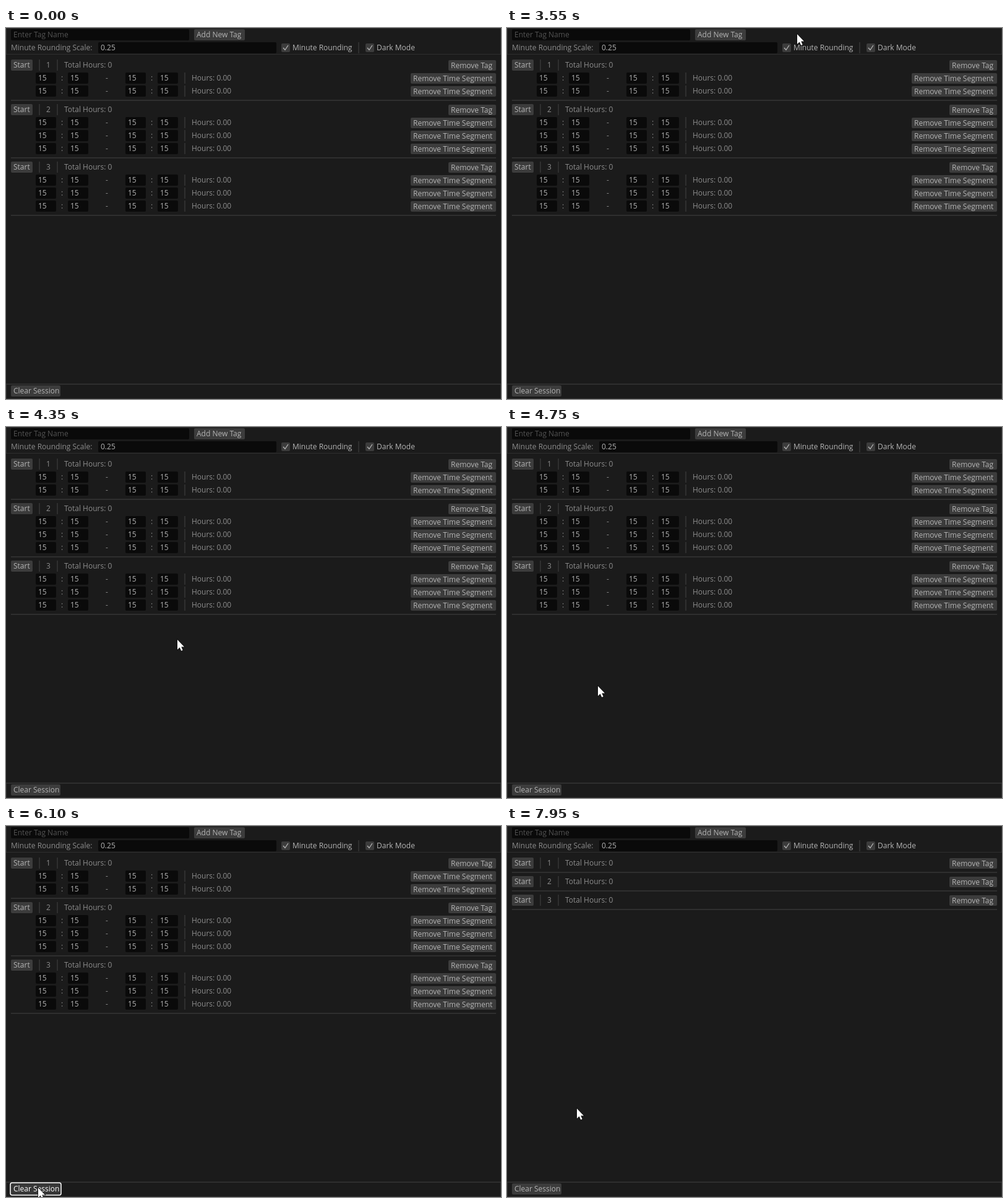
An HTML page with a canvas that plays this animation: 800x600 px, repeating every 8000 ms.

```html
<!DOCTYPE html>
<html lang="en">
<head>
<meta charset="utf-8">
<title>Time tracker</title>
<style>
  html, body { margin: 0; width: 100%; height: 100%; overflow: hidden; background: #1b1b1b; }
  canvas { display: block; }
</style>
</head>
<body>
<canvas id="stage" width="800" height="600"></canvas>
<script>
const ctx = document.getElementById('stage').getContext('2d');
const LOOP = 8000, STEP = 50;
const ENTER = 3550, PRESS = 6100, RELEASE = 7000;
const LABEL = '#8c8c8c', BUTTON_TEXT = '#b4b4b4', LINE = '#2f2f2f';

// Pointer keys: time, x, y
const path = [
  [3550, 469, 10], [4000, 410, 165], [4350, 277, 344], [4750, 147, 419],
  [5200, 87, 493], [5900, 52, 585], [7150, 52, 585], [7200, 52, 580],
  [7650, 52, 580], [7950, 113, 457]
];

function slope(i, axis) {
  const a = path[i], b = path[i + 1];
  return a && b ? (b[axis] - a[axis]) / (b[0] - a[0]) : null;
}

function tangent(i, axis) {
  const before = slope(i - 1, axis), after = slope(i, axis);
  if (before === null) return after;
  if (after === null) return before;
  return before * after <= 0 ? 0 : 2 * before * after / (before + after);
}

function pointerAt(t) {
  if (t < ENTER) return null;
  let i = 0;
  while (i < path.length - 2 && t >= path[i + 1][0]) i++;
  const a = path[i], b = path[i + 1], span = b[0] - a[0];
  const u = Math.min(1, (t - a[0]) / span), v = 1 - u;
  const at = axis => Math.round(
    a[axis] * (1 + 2 * u) * v * v + b[axis] * u * u * (3 - 2 * u) +
    span * u * v * (tangent(i, axis) * v - tangent(i + 1, axis) * u));
  return { x: at(1), y: at(2) };
}

function inside(p, x, y, w, h) {
  return p !== null && p.x >= x && p.x < x + w && p.y >= y && p.y < y + h;
}

function box(x, y, w, h, fill, stroke, radius = 2, line = 1) {
  ctx.beginPath();
  ctx.roundRect(x, y, w, h, radius);
  ctx.fillStyle = fill;
  ctx.fill();
  if (stroke) {
    ctx.strokeStyle = stroke;
    ctx.lineWidth = line;
    ctx.stroke();
  }
}

function rect(x, y, w, h, color = LINE) {
  ctx.fillStyle = color;
  ctx.fillRect(x, y, w, h);
}

function text(str, x, centerY, color = LABEL) {
  ctx.fillStyle = color;
  ctx.fillText(str, x, centerY + 4);
}

function button(str, x, y, w, h = 18) {
  box(x, y, w, h, '#3c3c3c');
  text(str, x + 4, y + Math.ceil(h / 2), BUTTON_TEXT);
}

function field(str, x, y, w, color = BUTTON_TEXT) {
  box(x, y, w, 18, '#0a0a0a');
  text(str, x + 4, y + 9, color);
}

function checkbox(str, x, hot) {
  const color = hot ? '#f0f0f0' : BUTTON_TEXT;
  if (hot) box(x - 1, 24, 16, 16, '#464646', '#969696', 3);
  else box(x, 25, 14, 14, '#3c3c3c');
  ctx.beginPath();
  ctx.moveTo(x + 3, 32);
  ctx.lineTo(x + 6, 35.5);
  ctx.lineTo(x + 11, 28);
  ctx.strokeStyle = color;
  ctx.lineWidth = 1.3;
  ctx.stroke();
  text(str, x + 18, 32, color);
}

function segment(y) {
  for (const x of [48, 100, 193, 245]) field('15', x, y - 9, 33);
  text(':', 89, y);
  text('-', 161, y);
  text(':', 234, y);
  rect(288, y - 9, 2, 18);
  text('Hours: 0.00', 300, y);
  button('Remove Time Segment', 654, y - 8, 138, 17);
}

function tags(counts) {
  let y = 60;
  counts.forEach((count, i) => {
    button('Start', 8, y - 9, 35);
    rect(53, y - 9, 2, 18);
    text(String(i + 1), 65, y);
    rect(82, y - 9, 2, 18);
    text('Total Hours: 0', 94, y);
    button('Remove Tag', 715, y - 8, 77, 17);
    for (let n = 0; n < count; n++) segment(y += 21);
    rect(8, y + 14, 784, 2);
    y += 30;
  });
}

function frameLines() {
  rect(0, 0, 800, 1);
  rect(0, 0, 1, 43);
  rect(799, 0, 1, 43);
  rect(0, 42, 800, 1);
  rect(0, 575, 800, 2);
  rect(0, 575, 1, 25);
  rect(799, 575, 1, 25);
  rect(0, 599, 800, 1);
}

function clearButton(pointer, t) {
  if (!inside(pointer, 8, 576, 80, 22)) return button('Clear Session', 8, 578, 80);
  const pressed = t >= PRESS && t < RELEASE;
  box(7, 577, 82, 20, pressed ? '#373737' : '#464646', pressed ? '#fff' : '#969696', 3, 1.5);
  text('Clear Session', 12, 587, pressed ? '#fff' : '#f0f0f0');
}

const arrow = new Path2D('M0 0V16L3.7 12.6L6.2 18L8.7 17L6.3 11.6H11Z');

function drawPointer({ x, y }) {
  ctx.save();
  ctx.translate(x, y);
  ctx.strokeStyle = '#111';
  ctx.lineWidth = 1.5;
  ctx.stroke(arrow);
  ctx.fillStyle = '#fff';
  ctx.fill(arrow);
  ctx.restore();
}

function draw(t) {
  const pointer = pointerAt(t);
  rect(0, 0, 800, 600, '#1b1b1b');
  ctx.font = '12px "Open Sans", "Noto Sans", sans-serif';
  frameLines();

  field('Enter Tag Name', 8, 2, 288, '#535353');
  button('Add New Tag', 304, 2, 82);
  text('Minute Rounding Scale:', 8, 32);
  field('0.25', 149, 23, 288);
  checkbox('Minute Rounding', 445, inside(pointer, 445, 22, 114, 20));
  rect(569, 23, 2, 18);
  checkbox('Dark Mode', 581, false);

  tags(t < RELEASE ? [2, 3, 3] : [0, 0, 0]);
  clearButton(pointer, t);
  if (pointer) drawPointer(pointer);
}

const start = performance.now();
function tick() {
  const t = (performance.now() - start) % LOOP;
  draw(Math.floor(t / STEP) * STEP);
  requestAnimationFrame(tick);
}
tick();
</script>
</body>
</html>
```
